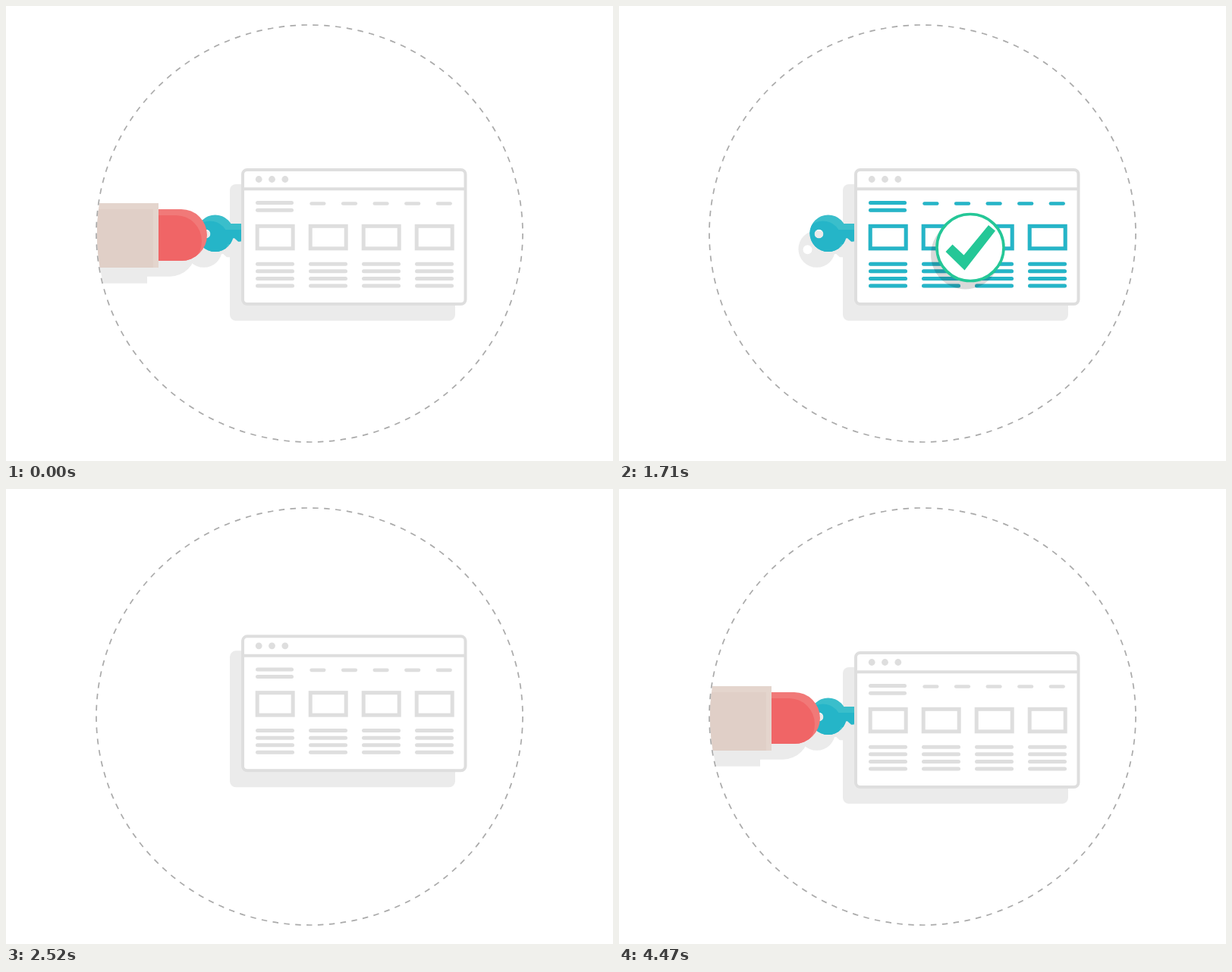
Write an HTML page with a canvas that moves like this. It is 800 px wide and 600 px high and loops after 4.53 s.

```html
<!DOCTYPE html>
<html lang="en">
<head>
<meta charset="utf-8">
<title>Key unlocks page</title>
<style>
html, body { margin: 0; height: 100%; overflow: hidden; background: #fff; }
canvas { display: block; }
</style>
</head>
<body>
<canvas id="stage" width="800" height="600"></canvas>
<script>
const ctx = document.getElementById('stage').getContext('2d');
const LOOP = 4530, STEP = 30, TAU = Math.PI * 2;
const GREY = '#dedede', SHADOW = '#ebebeb', TEAL = '#25b5c8', GREEN = '#25c797';
const SLIDE = 402;

// Progress from 0 to 1 within a time span
const span = (t, start, length) => Math.min(1, Math.max(0, (t - start) / length));
const sineInOut = x => (1 - Math.cos(Math.PI * x)) / 2;
const easeOut = (x, power) => 1 - (1 - x) ** power;
const backOut = x => 1 + 2 * (x - 1) ** 3 + (x - 1) ** 2;
const mix = (a, b, p) => a + (b - a) * p;

function polygon(points) {
  const path = new Path2D();
  points.forEach(([x, y], i) => i ? path.lineTo(x, y) : path.moveTo(x, y));
  path.closePath();
  return path;
}

function roundRect(x, y, w, h, r) {
  const path = new Path2D();
  path.roundRect(x, y, w, h, r);
  return path;
}

function ellipse(rx, ry) {
  const path = new Path2D();
  path.ellipse(400, 300, rx, ry, 0, 0, TAU);
  return path;
}

const solidKey = polygon([[285, 287], [325, 287], [333, 296], [324, 305], [317, 300.5],
  [310, 310.5], [306, 310.5], [301, 306], [296, 307], [285, 307]]);
solidKey.moveTo(300, 299.8);
solidKey.arc(275.7, 299.8, 24.3, 0, TAU);

const key = new Path2D(solidKey);
key.moveTo(269.5, 300.5);
key.arc(263.5, 300.5, 6, 0, TAU, true);

const sleeve = new Path2D();
sleeve.rect(-100, 260, 301, 85);

const fist = new Path2D();
fist.moveTo(150, 268);
fist.arc(231, 302, 34, -Math.PI / 2, Math.PI / 2);
fist.lineTo(150, 336);
fist.closePath();

const windowShape = roundRect(312, 216, 293.5, 177, 6);
const windowShadow = roundRect(295, 235, 297, 180, 8);
const tick = polygon([[430.5, 324], [439.5, 314.5], [454.5, 328.5], [487, 289], [496, 296.5], [455.5, 348.5]]);
const border = ellipse(281, 275), view = ellipse(280, 274);

function at(x, y, draw) {
  ctx.save();
  ctx.translate(x, y);
  draw();
  ctx.restore();
}

function fill(path, color) {
  ctx.fillStyle = color;
  ctx.fill(path);
}

// Light shape with a darker copy of itself shifted down and left
function shaded(path, light, dark, inner = path) {
  ctx.save();
  fill(path, light);
  ctx.clip(path);
  ctx.translate(-7, 8);
  fill(inner, dark);
  ctx.restore();
}

function line(x, y, length, p) {
  ctx.beginPath();
  ctx.moveTo(x, y);
  ctx.lineTo(x + length * p, y);
  ctx.stroke();
}

function content(color, p) {
  if (p <= 0) return;
  ctx.strokeStyle = color;
  ctx.lineWidth = 5;
  ctx.lineCap = 'round';
  for (const y of [259.6, 269.2]) line(331.5, y, 45, p);
  for (let i = 0; i < 4; i++) {
    const x = 331.5 + i * 70;
    for (let j = 0; j < 4; j++) line(x, 340.2 + j * 9.6, 46, p);
    const w = 47, h = 29.5, around = 2 * (w + h);
    if (p < 1) ctx.setLineDash([around * p, around]);
    ctx.strokeRect(x - 0.3, 290.3, w, h);
    ctx.setLineDash([]);
  }
  ctx.lineWidth = 4.6;
  for (let i = 0; i < 5; i++) line(402.6 + i * 41.6, 260.5, 16.6, p);
}

function browser(p) {
  fill(windowShape, '#fff');
  ctx.strokeStyle = GREY;
  ctx.lineWidth = 4;
  ctx.stroke(windowShape);
  line(312, 241.3, 293, 1);
  for (let i = 0; i < 3; i++) disc(333.2 + i * 17.3, 228.5, 4.4, GREY);
  content(GREY, 1);
  content(TEAL, p);
}

function disc(x, y, r, color) {
  ctx.beginPath();
  ctx.arc(x, y, r, 0, TAU);
  ctx.fillStyle = color;
  ctx.fill();
}

function badge(scale) {
  if (scale <= 0) return;
  at(463, 318.5, () => {
    ctx.scale(scale, scale);
    ctx.translate(-463, -318.5);
    disc(456.5, 328, 45.5, 'rgba(0,0,0,.15)');
    disc(463, 318.5, 44, '#fff');
    ctx.strokeStyle = GREEN;
    ctx.lineWidth = 3.6;
    ctx.stroke();
    fill(tick, GREEN);
  });
}

// Hand offset: nudge, leave, come back with a key, push it in
function handOffset(t) {
  if (t < 2000) {
    const nudge = Math.sin(Math.PI * span(t, 120, 480));
    const away = Math.max(0, (t - 600) / 450) ** 2;
    return [3 * nudge - 113 * away, -1.5 * nudge + 57 * away];
  }
  const enter = easeOut(span(t, 3900, 215), 2);
  const push = 1 - sineInOut(span(t, 4230, 240));
  return [mix(-197, -26 * push, enter), mix(139, 1.5 * push, enter)];
}

function scene(y, { fillIn = 0, check = 0, keyPos, handPos }) {
  at(0, y, () => {
    at(-15, 20.7, () => {
      if (keyPos) at(...keyPos, () => fill(key, SHADOW));
      if (handPos) at(...handPos, () => { fill(sleeve, SHADOW); fill(fist, SHADOW); });
    });
    fill(windowShadow, SHADOW);
    if (keyPos) at(...keyPos, () => shaded(key, '#3abecb', TEAL, solidKey));
    if (handPos) at(...handPos, () => {
      shaded(fist, '#f17978', '#f06566');
      shaded(sleeve, '#e4d5cd', '#e0cfc7');
    });
    browser(fillIn);
    badge(check);
  });
}

function draw(t) {
  ctx.clearRect(0, 0, 800, 600);
  ctx.save();
  ctx.clip(view);
  const slide = easeOut(span(t, 2280, 460), 4);
  const lift = t > 2280 && t < 3930 ? 0.6 : 0;
  const hand = handOffset(t);
  if (slide < 1) {
    scene(slide * SLIDE - lift, {
      fillIn: sineInOut(span(t, 630, 1017)),
      check: backOut(span(t, 1465, 490)),
      keyPos: [0, 0],
      handPos: t < 1300 && hand
    });
  }
  if (slide > 0) {
    const entering = t > 3900 && hand;
    scene((slide - 1) * SLIDE - lift, { keyPos: entering, handPos: entering });
  }
  ctx.restore();

  ctx.strokeStyle = '#aaa';
  ctx.lineWidth = 1.7;
  ctx.lineCap = 'butt';
  ctx.setLineDash([7.5, 7.43]);
  ctx.stroke(border);
  ctx.setLineDash([]);
}

const begin = performance.now();
function frame() {
  const t = (performance.now() - begin) % LOOP;
  draw(Math.floor(t / STEP) * STEP);
  requestAnimationFrame(frame);
}
frame();
</script>
</body>
</html>
```
